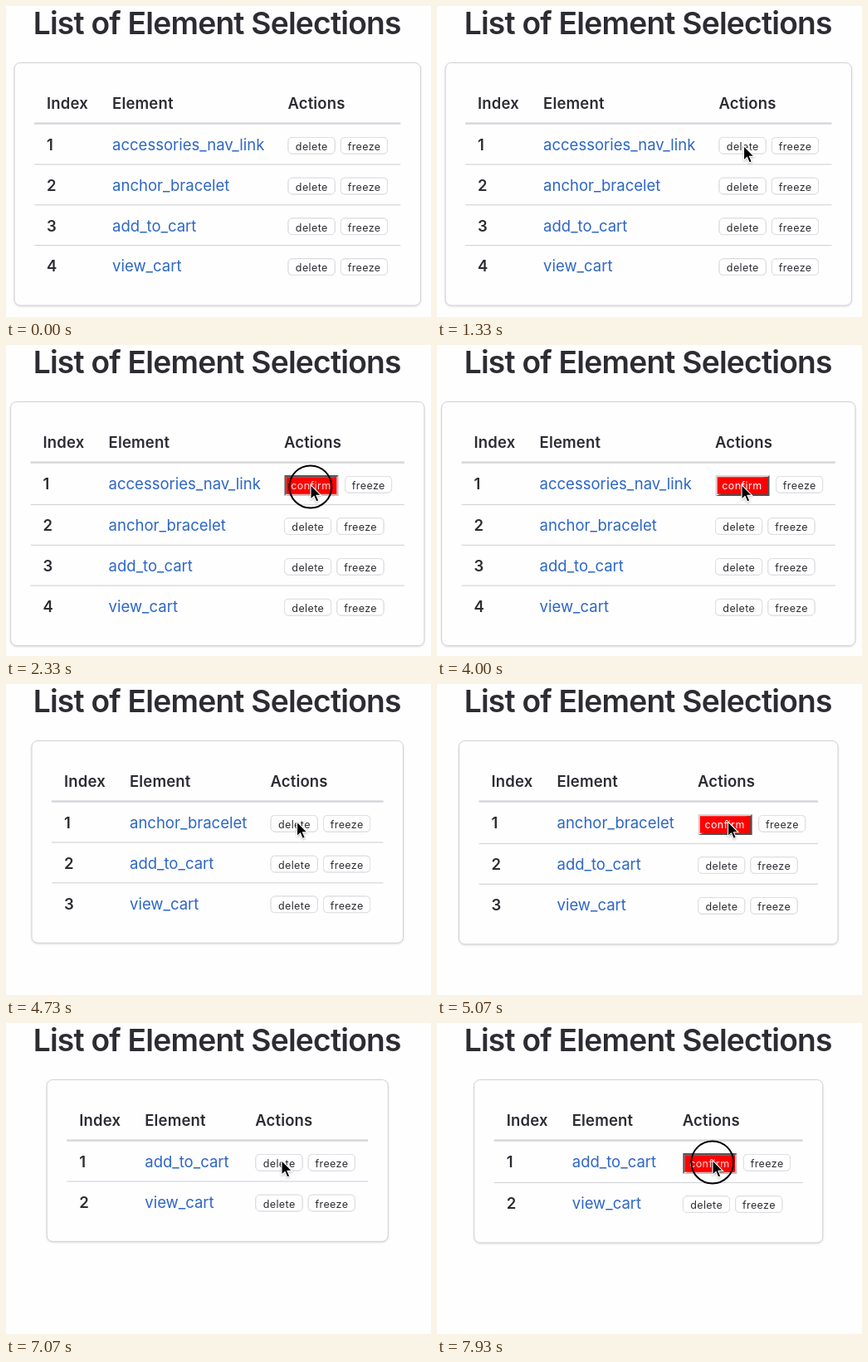
An HTML page that plays this animation: 512x375 px, repeating every 8 s.

```html
<!DOCTYPE html>
<html lang="en">
<head>
<meta charset="utf-8">
<title>List of Element Selections</title>
<style>
  html, body { margin: 0; width: 100%; height: 100%; overflow: hidden; background: #fffeff; }
  svg { display: block; width: 512px; height: 375px; }
  text { font: 400 18.5px Inter, sans-serif; font-optical-sizing: none; fill: #2c2c32; }
  .title { font-size: 37.2px; font-weight: 600; letter-spacing: -0.021em; text-anchor: middle; }
  .bold { font-weight: 600; letter-spacing: 0.15px; }
  .link { fill: #2c66c6; }
  .label { font-size: 12.5px; letter-spacing: 0.4px; text-anchor: middle; }
  .white { fill: #fff; }
  .pressed { fill: #ffdcdc; }
  .box { fill: #fffeff; stroke: #d0d0d5; filter: drop-shadow(0 1px 1px rgba(0, 0, 0, .13)); }
  .button { fill: #fff; stroke: #e0e0e4; filter: drop-shadow(0 .8px .6px rgba(0, 0, 0, .26)); }
  .rule { fill: #d5d5da; }
  #cursor { stroke: #fff; stroke-width: 1.1; filter: drop-shadow(0 1px 1px rgba(0, 0, 0, .25)); }
  #ring { fill: none; stroke: #000; stroke-width: 2; }
</style>
</head>
<body>
<svg viewBox="0 0 512 375">
  <text class="title" x="254.2" y="33.5">List of Element Selections</text>
  <g id="table"></g>
  <circle id="ring" r="25.5"/>
  <path id="cursor" d="M0 0V17.6L4 13.9L6.8 20.4L9.8 19.1L7 12.8H12.6Z"/>
</svg>
<script>
const LOOP = 8000;
const CENTER = 254.75;
const ROW = 48.8;
const NAMES = ['accessories_nav_link', 'anchor_bracelet', 'add_to_cart', 'view_cart'];
// Distance from the box edge to the actions column, by number of deleted rows.
const ACTIONS = [329.3, 287.5, 251];

const STATES = [
  { at: 0, deleted: 0, confirm: false },
  { at: 1930, deleted: 0, confirm: true },
  { at: 4070, deleted: 1, confirm: false },
  { at: 4930, deleted: 1, confirm: true },
  { at: 6670, deleted: 2, confirm: false },
  { at: 7530, deleted: 2, confirm: true },
];
const CLICKS = [1800, 2330, 4800, 5130, 7400, 7930];
const HOLD = 130, FADE = 140;

// Cursor tip: time, x, y
const PATH = [
  [600, 516, 160], [870, 497, 150], [1040, 440, 125], [1270, 369.5, 168.6],
  [1600, 369.5, 168.6], [1670, 367, 168.6], [4530, 367, 168.6], [4730, 350.5, 166],
  [6000, 350.5, 166], [6130, 349.5, 165.6], [6930, 349.5, 165.6], [7070, 332, 165.6],
];

const $ = id => document.getElementById(id);
const text = (cls, x, y, s) => `<text class="${cls}" x="${x}" y="${y}">${s}</text>`;
const rect = (cls, x, y, w, h, r = 0) =>
  `<rect class="${cls}" x="${x}" y="${y}" width="${w}" height="${h}" rx="${r}"/>`;

const button = (x, y, label) =>
  rect('button', x + .7, y - 15.5, 56, 19.5, 4.5) + text('label', x + 28.9, y, label);

function confirmButton(x, y, pressed) {
  const [topLeft, bottomRight] = pressed ? ['#555', '#c8bcbc'] : ['#dcd2d2', '#505050'];
  return `<g transform="translate(${x} ${y - 17})">
    <path fill="${bottomRight}" d="M0 25H65V0Z"/>
    <path fill="${topLeft}" d="M0 25V0H65L62.7 2.2H2.2V22.7Z"/>
    <path fill="#f00" d="M2.2 2.2H62.7V22.7H2.2Z"/>
  </g>` + text(`label ${pressed ? 'pressed' : 'white'}`, x + 32, y, 'confirm');
}

function drawTable({ deleted, confirm }, pressed) {
  const names = NAMES.slice(deleted);
  const width = ACTIONS[deleted] + (confirm ? 169 : 160);
  const left = CENTER - width / 2;
  const actions = left + ACTIONS[deleted];
  const grow = confirm ? 1.5 : 0;
  const height = 97.3 + names.length * ROW + grow;

  let out = rect('box', left, 68.5, width, height, 7);
  out += text('bold', left + 39, 124, 'Index')
    + text('bold', left + 118, 124, 'Element')
    + text('bold', actions, 124, 'Actions')
    + rect('rule', left + 24, 140.4, width - 48, 2.4);

  names.forEach((name, i) => {
    const y = 174 + i * ROW + (i ? grow : 0);
    const asking = confirm && i === 0;
    out += text('bold', left + 39, y, i + 1) + text('link', left + 118, y, name);
    out += asking ? confirmButton(actions + .6, y, pressed) : button(actions, y, 'delete');
    out += button(actions + (asking ? 73 : 63.3), y, 'freeze');
    if (i < names.length - 1)
      out += rect('rule', left + 24, 190.4 + i * ROW + grow, width - 48, 1.2);
  });
  return out;
}

function cursorAt(t) {
  const next = PATH.findIndex(p => p[0] > t);
  if (next === 0) return [-50, -50];
  if (next < 0) return PATH[PATH.length - 1].slice(1);
  const [t0, x0, y0] = PATH[next - 1], [t1, x1, y1] = PATH[next];
  const k = (t - t0) / (t1 - t0), e = k * k * (3 - 2 * k);
  return [x0 + (x1 - x0) * e, y0 + (y1 - y0) * e];
}

let shown = '';
function draw(t) {
  const state = STATES.filter(s => s.at <= t).pop();
  const click = CLICKS.filter(c => c <= t).pop() ?? -LOOP;
  const age = t - click;
  const pressed = state.confirm && click > state.at && age < HOLD;

  const key = state.at + '/' + pressed;
  if (key !== shown) {
    $('table').innerHTML = drawTable(state, pressed);
    shown = key;
  }

  const [x, y] = cursorAt(t);
  $('cursor').setAttribute('transform', `translate(${x} ${y})`);
  $('ring').setAttribute('transform', `translate(${x - .2} ${y + 2.3})`);
  $('ring').setAttribute('opacity', Math.max(0, Math.min(1, 1 - (age - HOLD) / FADE)));
}

function tick() {
  draw(performance.now() % LOOP);
  requestAnimationFrame(tick);
}
tick();
</script>
</body>
</html>
```
